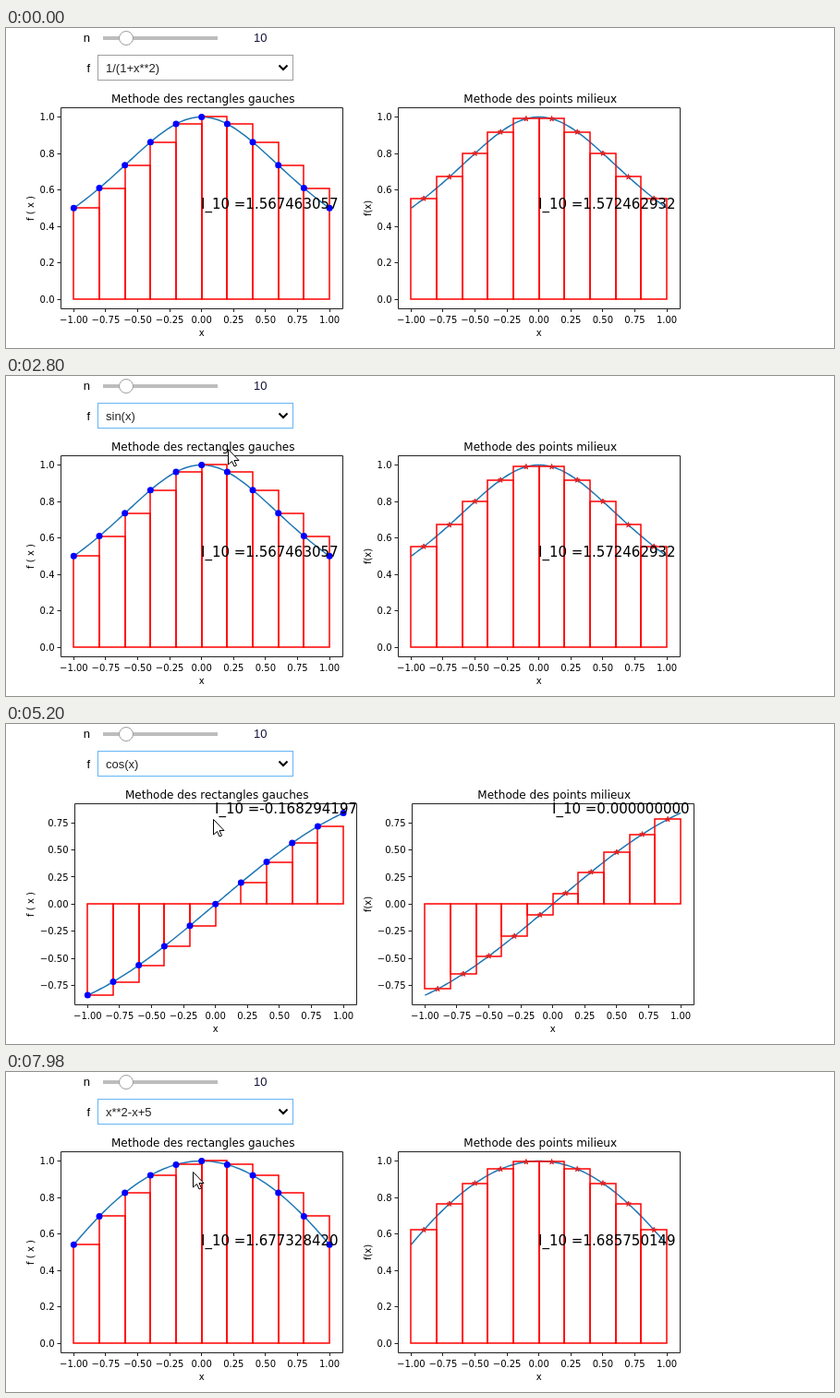
Write an HTML page with a canvas that moves like this. It is 896 by 347 pixels and loops after 8000 ms.

```html
<!DOCTYPE html>
<html lang="fr">
<head>
<meta charset="utf-8">
<title>Integration</title>
<style>
html, body { margin: 0; width: 100%; height: 100%; overflow: hidden; background: #fff; }
canvas { display: block; }
</style>
</head>
<body>
<canvas id="stage" width="896" height="347"></canvas>
<script>
const ctx = document.getElementById('stage').getContext('2d');
const LOOP = 8000, STEP = 68;
const PLOT_FONT = '"DejaVu Sans", sans-serif';
const UI_FONT = '13px "Liberation Sans", Arial, sans-serif';
const N = 10, H = 2 / N;

const FUNCS = [
  { label: '1/(1+x**2)', f: x => 1 / (1 + x * x) },
  { label: 'sin(x)', f: Math.sin },
  { label: 'cos(x)', f: Math.cos },
  { label: 'x**2-x+5', f: x => x * x - x + 5 }
];

// [time, index into FUNCS]
const CHOSEN = [[0, 0], [2730, 1], [5130, 2], [7580, 3]];
const PLOTTED = [[0, 0], [3260, 1], [5530, 2]];
// [opens, closes]
const LIST_OPEN = [[1710, 2730], [3960, 5130], [6280, 7580]];
const CLICKS = [[1640, 1860], [2530, 2730], [3890, 4160], [4930, 5130], [6280, 6480], [7380, 7580]];
const FOCUS_AT = 1640;
// [start, steps, x, y]: the pointer reaches x, y on the last step
const MOVES = [
  [880, 1, 567, 264], [950, 8, 241, 53], [2130, 3, 240, 79], [3480, 4, 241, 40],
  [4160, 6, 230, 95], [4570, 3, 224, 103], [5530, 5, 226, 54], [6010, 1, 226, 53],
  [6750, 1, 224, 78], [6820, 5, 207, 121], [7910, 2, 202, 108]
];

const AXES = { top: 86.6, w: 304.4, h: 217.4 };
const LIST = { x: 99, y: 57, w: 212, h: 69, row: 16.7 };

const within = (spans, t) => spans.some(([a, b]) => t >= a && t < b);
const current = (keys, t) => keys.filter(k => t >= k[0]).pop()[1];
const snap = v => Math.floor(v) + 0.5;

function pointerAt(t) {
  let pos = null;
  for (const [start, steps, x, y] of MOVES) {
    if (t < start) break;
    const k = Math.min(steps, Math.floor((t - start) / STEP) + 1);
    const p = 1 - Math.pow(1 - k / steps, 1.6);
    pos = pos ? { x: Math.round(pos.x + (x - pos.x) * p), y: Math.round(pos.y + (y - pos.y) * p) } : { x, y };
  }
  return pos;
}

function write(str, x, y, font, align = 'left', color = '#000') {
  ctx.font = font;
  ctx.textAlign = align;
  ctx.fillStyle = color;
  ctx.fillText(str, x, y);
}

function stroke(points, color, width, close) {
  ctx.beginPath();
  points.forEach(([x, y]) => ctx.lineTo(x, y));
  if (close) ctx.closePath();
  ctx.strokeStyle = color;
  ctx.lineWidth = width;
  ctx.stroke();
}

function disc(x, y, r, fill) {
  ctx.beginPath();
  ctx.arc(x, y, r, 0, 7);
  ctx.fillStyle = fill;
  ctx.fill();
}

function ring(x, y, r, color) {
  ctx.beginPath();
  ctx.arc(x, y, r, 0, 7);
  ctx.strokeStyle = color;
  ctx.lineWidth = 1;
  ctx.stroke();
}

function star(x, y) {
  ctx.beginPath();
  for (let i = 0; i < 10; i++) {
    const r = i % 2 ? 1.15 : 3, a = i * Math.PI / 5 - Math.PI / 2;
    ctx.lineTo(x + r * Math.cos(a), y + r * Math.sin(a));
  }
  ctx.closePath();
  ctx.fillStyle = ctx.strokeStyle = '#d62728';
  ctx.lineWidth = 1;
  ctx.lineJoin = 'bevel';
  ctx.fill();
  ctx.stroke();
  ctx.lineJoin = 'miter';
}

function number(v, digits) {
  return (v < 0 ? '\u2212' : '') + Math.abs(v).toFixed(digits);
}

function drawPlot(left, which, mid) {
  const f = FUNCS[which].f, odd = which === 1;
  const { top, w, h } = AXES;
  const center = left + w / 2, bottom = top + h;
  const hi = odd ? Math.sin(1) : 1, lo = odd ? -hi : 0;
  const px = x => center + x * w / 2.2;
  const py = y => bottom - h / 22 - (y - lo) / (hi - lo) * h / 1.1;
  const tickFont = '10px ' + PLOT_FONT;

  for (let i = -4; i <= 4; i++) {
    const x = snap(px(i / 4));
    stroke([[x, 304], [x, 308]], '#222', 1);
    write(number(i / 4, 2), px(i / 4), 320, tickFont, 'center');
  }
  for (let i = odd ? -3 : 0; i <= (odd ? 3 : 5); i++) {
    const v = i * (odd ? 0.25 : 0.2), y = snap(py(v));
    stroke([[left - 4, y], [left, y]], '#222', 1);
    write(number(v, odd ? 2 : 1), left - 7, Math.round(py(v) + 3.6), tickFont, 'right');
  }

  const curve = [];
  for (let i = 0; i <= 100; i++) {
    const x = i / 50 - 1;
    curve.push([px(x), py(f(x))]);
  }
  stroke(curve, '#1f77b4', 1.5);

  let sum = 0;
  const marks = [];
  for (let i = 0; i < N; i++) {
    const a = (2 * i - N) / N, at = mid ? a + H / 2 : a, v = f(at);
    const [x0, x1, y0, y1] = [px(a), px(a + H), py(0), py(v)].map(Math.round);
    sum += H * v;
    stroke([[x0, y0], [x0, y1], [x1, y1], [x1, y0]], '#f00', 1.5, true);
    marks.push([px(at), py(v)]);
  }
  if (!mid) marks.push([px(1), py(f(1))]);
  marks.forEach(([x, y]) => mid ? star(x, y) : disc(x, y, 3.5, '#00f'));

  const l = snap(left), r = snap(left + w + 0.4), tp = snap(top), b = snap(bottom + 0.3);
  stroke([[l, tp], [r, tp], [r, b], [l, b]], '#222', 1, true);

  if (Math.abs(sum) < 1e-12) sum = 0;
  write('I_10 =' + sum.toFixed(9), Math.round(center - 0.7), Math.round(py(f(1)) + 0.3), '15px ' + PLOT_FONT);
  write(mid ? 'Methode des points milieux' : 'Methode des rectangles gauches',
    center + 1.5, 81, '12px ' + PLOT_FONT, 'center');
  write('x', center, 334, tickFont, 'center');

  ctx.save();
  ctx.translate(mid ? 395 : 30, 195.5);
  ctx.rotate(-Math.PI / 2);
  write(mid ? 'f(x)' : 'f ( x )', 0, 0, tickFont, 'center');
  ctx.restore();
}

function drawControls(t) {
  write('n', 91, 15, UI_FONT, 'right');
  ctx.fillStyle = '#bdbdbd';
  ctx.fillRect(105, 9, 124, 4);
  disc(130, 11, 7.5, '#fff');
  ring(130, 11, 7.5, '#9e9e9e');
  write('10', 268, 15, UI_FONT, 'left', '#14143c');

  write('f', 91, 48, UI_FONT, 'right');
  ctx.strokeStyle = t >= FOCUS_AT ? '#64b5f6' : '#9e9e9e';
  ctx.lineWidth = 1;
  ctx.strokeRect(99.5, 29.5, 211, 27);
  write(FUNCS[current(CHOSEN, t)].label, 108, 48, UI_FONT, 'left', '#222');
  stroke([[295.5, 40.5], [300, 45], [304.5, 40.5]], '#000', 2);
}

function drawList(t, pointer) {
  const { x, y, w, h, row } = LIST;
  ctx.save();
  ctx.shadowColor = 'rgba(0,0,0,.25)';
  ctx.shadowBlur = 7;
  ctx.shadowOffsetY = 4;
  ctx.beginPath();
  ctx.rect(x - 20, y, w + 40, h + 30);
  ctx.clip();
  ctx.fillStyle = '#fff';
  ctx.fillRect(x, y, w, h);
  ctx.restore();
  ctx.strokeStyle = '#777';
  ctx.lineWidth = 1;
  ctx.strokeRect(x + 0.5, y + 0.5, w - 1, h - 1);

  const first = y + 1;
  const hot = pointer.y >= first ? Math.floor((pointer.y - first) / row) : current(CHOSEN, t);
  FUNCS.forEach(({ label }, i) => {
    const a = Math.round(first + i * row), b = Math.round(first + (i + 1) * row);
    if (i === hot) {
      ctx.fillStyle = '#1e90ff';
      ctx.fillRect(x + 1, a, w - 2, b - a);
    }
    write(label, 108, a + 12, UI_FONT, 'left', i === hot ? '#fff' : '#333');
  });
}

function drawPointer({ x, y }, pressed) {
  if (pressed) {
    ring(x, y, 11, '#000');
    ring(x, y, 10, '#fff');
  }
  const shape = [[0, 0], [0, 16.5], [4, 13], [6.5, 18.5], [9, 17.5], [6.5, 12], [11.5, 12]];
  ctx.beginPath();
  shape.forEach(([dx, dy]) => ctx.lineTo(x + 0.5 + dx, y + 0.5 + dy));
  ctx.closePath();
  ctx.fillStyle = '#fff';
  ctx.strokeStyle = '#000';
  ctx.lineWidth = 1;
  ctx.lineJoin = 'round';
  ctx.fill();
  ctx.stroke();
  ctx.lineJoin = 'miter';
}

function draw(t) {
  ctx.fillStyle = '#fff';
  ctx.fillRect(0, 0, 896, 347);
  const which = current(PLOTTED, t), shift = which === 1 ? 15 : 0;
  drawPlot(59.5 + shift, which, false);
  drawPlot(424.5 + shift, which, true);
  drawControls(t);
  const pointer = pointerAt(t);
  if (within(LIST_OPEN, t)) drawList(t, pointer);
  if (pointer) drawPointer(pointer, within(CLICKS, t));
}

const begin = performance.now();
function tick() {
  draw((performance.now() - begin) % LOOP);
  requestAnimationFrame(tick);
}
tick();
</script>
</body>
</html>
```
